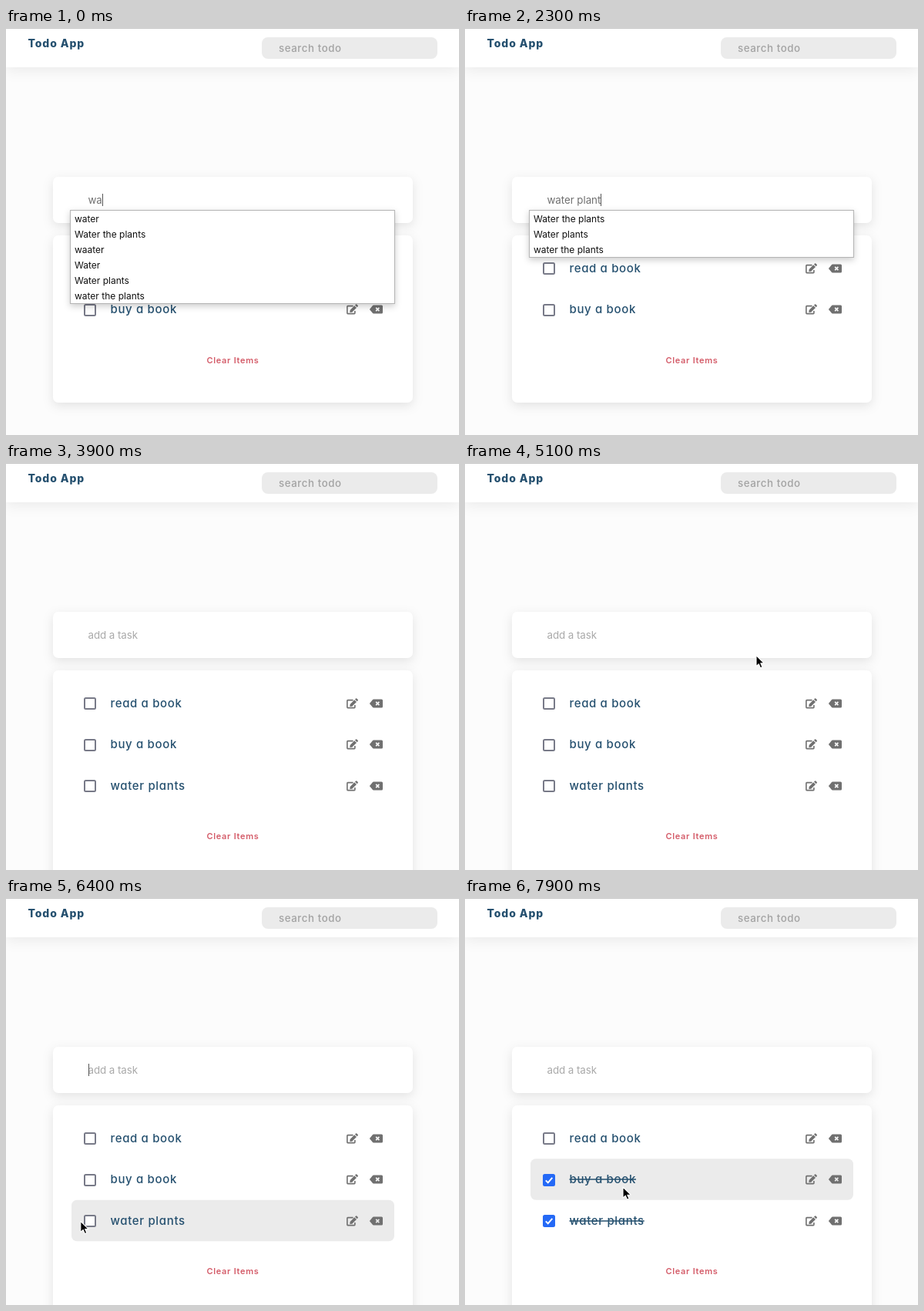
These frames come from a looping animation (588 by 528 pixels, 8000 ms). An HTML page:

```html
<!DOCTYPE html>
<html lang="en">
<head>
<meta charset="utf-8">
<title>Todo list</title>
<style>
html, body { margin: 0; width: 100%; height: 100%; overflow: hidden; background: #fcfcfc; }
svg { display: block; }
text { font-family: Inter, "Open Sans", sans-serif; white-space: pre; }
.card { fill: #fff; filter: drop-shadow(0 4px 7px rgba(0,0,0,.1)); }
.bar { fill: #fff; filter: drop-shadow(0 3px 9px rgba(0,0,0,.08)); }
.menu { fill: #fff; stroke: #b4b4b4; filter: drop-shadow(0 3px 4px rgba(0,0,0,.2)); }
.round { font-feature-settings: "cv11"; fill: #25506f; }
.brand { font-size: 14px; font-weight: 800; letter-spacing: .9px; }
.task { font-size: 15px; font-weight: 500; letter-spacing: .65px; }
.search { font-size: 13.33px; font-weight: 500; letter-spacing: .55px; fill: #a3a3a3; }
.entry { font-size: 13.33px; letter-spacing: -.05px; }
.option { font-size: 12px; fill: #111; }
.clear { font-size: 11px; font-weight: 600; letter-spacing: .7px; fill: #d45c69; text-anchor: middle; }
</style>
</head>
<body>
<svg id="stage" width="588" height="528" viewBox="0 0 588 528">
  <rect width="588" height="528" fill="#fcfcfc"/>
  <rect class="bar" width="588" height="51"/>
  <rect width="588" height="1" fill="#c6c6c6"/>
  <text class="round brand" x="28.5" y="25">Todo App</text>
  <rect x="332" y="12" width="228" height="28" rx="8" fill="#ebebeb"/>
  <text class="search" x="354" y="31">search todo</text>
  <rect class="card" x="61" y="193" width="467" height="60" rx="7"/>
  <rect class="card" id="list" x="61" y="269" width="467" height="217" rx="7"/>
  <g id="rows"></g>
  <text class="clear" id="clear" x="294.5" y="435">Clear Items</text>
  <text class="entry" id="entry" x="106.5" y="228"></text>
  <rect id="caret" y="215" width="1" height="16" fill="#555"/>
  <g id="menu"></g>
  <path id="mouse" d="M0 0V14.2L3.3 11.1 5.5 16.2 8 15.1 5.8 10.2H10.3Z" fill="#000" stroke="#fff" stroke-width="1.1" stroke-linejoin="round"/>
</svg>
<script>
const LOOP = 8000, TICK = 100;
const SUBMIT = 3340, SHOW_MOUSE = 5000, CHECK_WATER = 6600, CHECK_BUY = 7600;
const $ = id => document.getElementById(id);

function add(parent, tag, attrs, text) {
  const el = document.createElementNS("http://www.w3.org/2000/svg", tag);
  for (const k in attrs) el.setAttribute(k, attrs[k]);
  if (text) el.textContent = text;
  parent.appendChild(el);
  return el;
}
const show = (el, on) => el.setAttribute("visibility", on ? "visible" : "hidden");

// [time, typed text]
const typing = [
  [0, "wa"], [200, "wat"], [400, "wate"], [500, "water"], [700, "water "],
  [900, "water p"], [1100, "water pl"], [1300, "water pla"],
  [1600, "water plan"], [2000, "water plant"], [2600, "water plants"], [SUBMIT, ""]
];
// [time, suggestions]
const menus = [
  [0, ["water", "Water the plants", "waater", "Water", "Water plants", "water the plants"]],
  [300, ["water", "Water the plants", "Water", "Water plants", "water the plants", "Get water"]],
  [1000, ["Water the plants", "Water plants", "water the plants"]],
  [SUBMIT, []]
];
// [time, x, y] of the pointer tip
const path = [
  [SHOW_MOUSE, 398, 232], [5400, 270, 345], [5700, 176, 422], [5800, 169, 425],
  [6100, 130, 428], [6350, 96, 420], [CHECK_WATER, 104, 414], [6900, 106, 416],
  [7300, 109, 396], [7500, 109, 366], [7600, 109, 365], [7900, 205, 375]
];
const latest = (steps, t) => steps.filter(s => s[0] <= t).pop();

function pointer(t) {
  const i = path.findIndex(p => p[0] > t);
  if (i < 0) return path[path.length - 1].slice(1);
  if (i === 0) return null;
  const [t0, x0, y0] = path[i - 1], [t1, x1, y1] = path[i];
  let u = (t - t0) / (t1 - t0);
  u = u * u * (3 - 2 * u);
  return [x0 + (x1 - x0) * u, y0 + (y1 - y0) * u];
}

const rows = ["read a book", "buy a book", "water plants"].map((label, i) => {
  const g = add($("rows"), "g", {});
  const top = 284.8 + 53.5 * i, mid = Math.floor(312 + 53.5 * i);
  const boxY = Math.round(304 + 53.5 * i);
  const hover = add(g, "rect", { x: 85, y: top, width: 419, height: 53.5, rx: 7, fill: "#ebebeb" });
  const box = add(g, "rect", { x: 102, y: boxY + 1, width: 14, height: 14, rx: 1.5, "stroke-width": 2 });
  const tick = add(g, "path", {
    d: `M104.8 ${boxY + 8.4}l2.9 2.9 5.6-6.5`, fill: "none", stroke: "#fff", "stroke-width": 2
  });
  const text = add(g, "text", { class: "round task", x: 135.5, y: mid + 5 }, label);
  const edit = add(g, "g", { transform: `translate(442 ${mid - 7})` });
  add(edit, "path", {
    d: "M8.6 2.6H1.6Q.9 2.6 .9 3.4V11.8Q.9 12.6 1.6 12.6H10.1Q10.9 12.6 10.9 11.8V8.9",
    fill: "none", stroke: "#707070", "stroke-width": 1.6
  });
  add(edit, "path", {
    d: "M10.3 2.2L13 4.9 7.2 10.7 4.3 11 4.6 8.1ZM11 1.5L12.1 .4Q12.7 -.1 13.3 .4L14.8 1.9Q15.3 2.5 14.8 3.1L13.7 4.2Z",
    fill: "#707070"
  });
  const erase = add(g, "g", { transform: `translate(472 ${mid - 5.5})` });
  add(erase, "path", {
    d: "M5 0H15.5Q17 0 17 1.5V9.5Q17 11 15.5 11H5Q4.4 11 4 10.6L.3 6Q0 5.5 .3 5L4 .4Q4.4 0 5 0Z",
    fill: "#707070"
  });
  const cross = add(erase, "path", { d: "M8.2 3.4l4.2 4.2m0-4.2l-4.2 4.2", "stroke-width": 1.6 });
  return { g, top, hover, box, tick, text, cross };
});

const frame = add($("menu"), "rect", { class: "menu", x: 83.5, y: 236.5, width: 421 });
const options = menus[0][1].map((_, i) => add($("menu"), "text", { class: "option", x: 89, y: 252 + 20 * i }));

function draw(t) {
  const [typedAt, typed] = latest(typing, t);
  const entry = $("entry");
  entry.textContent = typed || "add a task";
  entry.setAttribute("fill", typed ? "#707070" : "#a9a9a9");
  $("caret").setAttribute("x", typed ? Math.round(106.7 + entry.getComputedTextLength()) : 107);
  show($("caret"), t < CHECK_WATER && (t - typedAt) % 1000 < 500);

  const items = latest(menus, t)[1];
  show($("menu"), items.length > 0);
  frame.setAttribute("height", 20 * items.length + 1);
  options.forEach((o, i) => o.textContent = items[i] || "");

  const added = t >= SUBMIT;
  $("list").setAttribute("height", added ? 270.5 : 217);
  $("clear").setAttribute("y", added ? 488 : 435);

  const tip = pointer(t);
  show($("mouse"), tip);
  if (tip) $("mouse").setAttribute("transform", `translate(${tip[0]} ${tip[1]})`);

  const done = [false, t >= CHECK_BUY, t >= CHECK_WATER];
  rows.forEach((r, i) => {
    const over = tip && tip[0] > 85 && tip[0] < 504 && tip[1] >= r.top && tip[1] < r.top + 53.5;
    r.g.setAttribute("display", i < 2 || added ? "inline" : "none");
    show(r.hover, over);
    show(r.tick, done[i]);
    r.box.setAttribute("fill", done[i] ? "#2469f6" : "#fff");
    r.box.setAttribute("stroke", done[i] ? "#2469f6" : "#787a88");
    r.text.setAttribute("text-decoration", done[i] ? "line-through" : "none");
    r.cross.setAttribute("stroke", over ? "#ebebeb" : "#fff");
  });
}

const start = performance.now();
function run(now) {
  const t = Math.max(0, now - start) % LOOP;
  draw(Math.floor(t / TICK) * TICK);
  requestAnimationFrame(run);
}
draw(0);
requestAnimationFrame(run);
</script>
</body>
</html>
```
